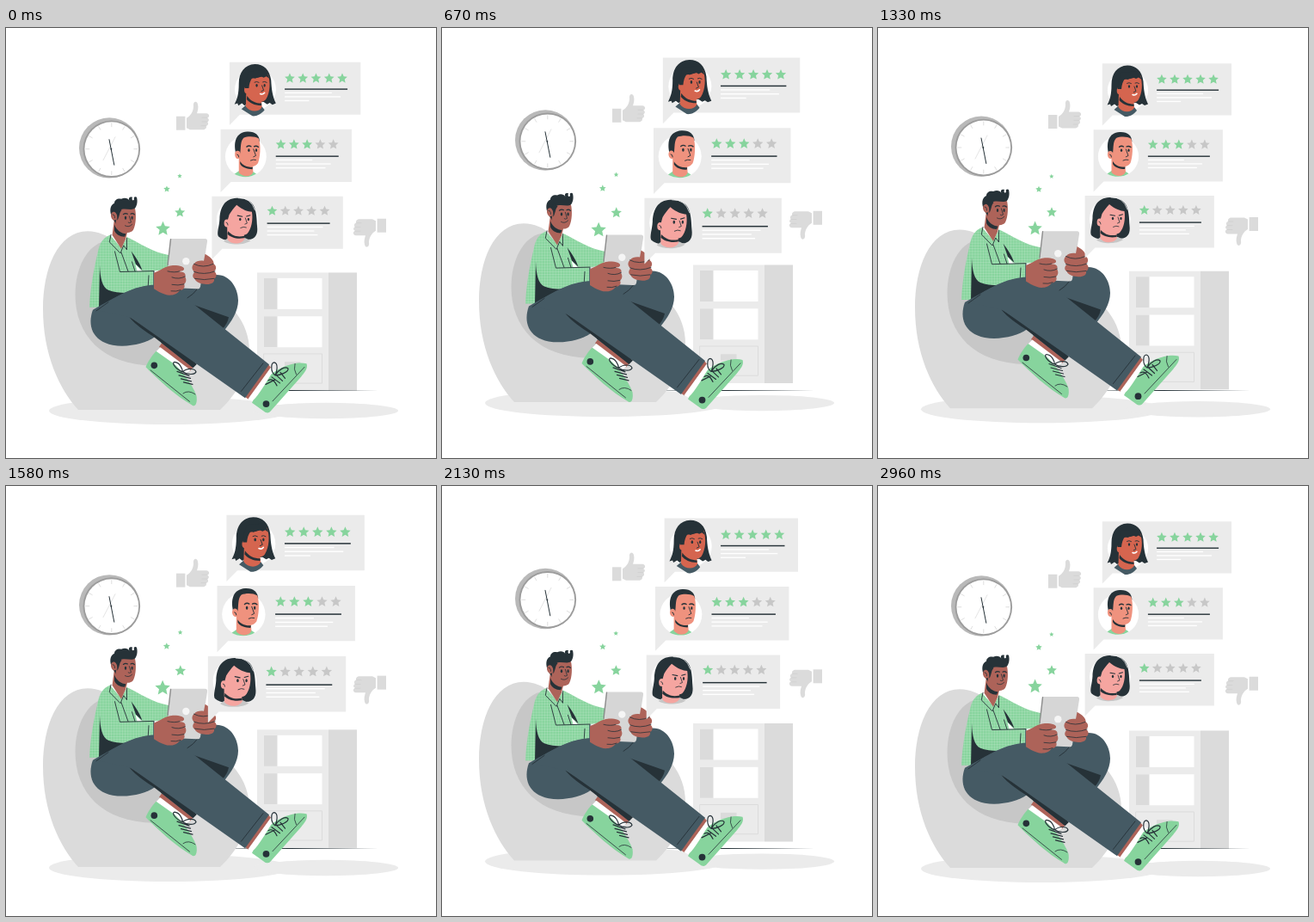
An HTML page with a canvas that plays this animation: 500x500 px, repeating every 3000 ms.

```html
<!DOCTYPE html>
<html lang="en">
<head>
<meta charset="utf-8">
<title>Reading reviews</title>
<style>
html, body { margin: 0; width: 100%; height: 100%; overflow: hidden; background: #fff; }
canvas { display: block; width: 500px; height: 500px; }
</style>
</head>
<body>
<canvas id="stage"></canvas>
<script>
const canvas = document.getElementById('stage');
const ctx = canvas.getContext('2d');
const ratio = Math.max(1, window.devicePixelRatio || 1);
canvas.width = canvas.height = 500 * ratio;

const GREEN = '#87d49d', DARK = '#263238', SLATE = '#455a64', SKIN = '#ad6359';
const PALE = '#ebebeb', GREY = '#dbdbdb', MID = '#c7c7c7', WHITE = '#fff';

const cache = {};
const path = d => cache[d] || (cache[d] = new Path2D(d));

function fill(color, d) {
  ctx.fillStyle = color;
  ctx.fill(path(d));
}

function line(color, width, d) {
  ctx.strokeStyle = color;
  ctx.lineWidth = width;
  ctx.stroke(path(d));
}

function rect(color, x, y, w, h) {
  ctx.fillStyle = color;
  ctx.fillRect(x, y, w, h);
}

function oval(color, x, y, rx, ry = rx, turn = 0) {
  ctx.fillStyle = color;
  ctx.beginPath();
  ctx.ellipse(x, y, rx, ry, turn, 0, Math.PI * 2);
  ctx.fill();
}

function star(color, x, y, r) {
  ctx.fillStyle = color;
  ctx.beginPath();
  for (let i = 0; i < 10; i++) {
    const a = i * Math.PI / 5 - Math.PI / 2;
    const d = i % 2 ? r * 0.47 : r;
    ctx.lineTo(x + d * Math.cos(a), y + d * Math.sin(a));
  }
  ctx.closePath();
  ctx.fill();
}

function group(draw, dx = 0, dy = 0) {
  ctx.save();
  ctx.translate(dx, dy);
  draw();
  ctx.restore();
}

function zoom(s, x, y, draw) {
  ctx.save();
  ctx.translate(x, y);
  ctx.scale(s, s);
  ctx.translate(-x, -y);
  draw();
  ctx.restore();
}

// Motion: p is the phase of a cycle, 0 to 1
const bob = p => -10 * (1 - Math.abs(1 - 2 * p));

function beat(p) {
  const keys = [[0, 1], [0.1, 1.1], [0.3, 1], [0.4, 1], [0.5, 1.1], [0.6, 1], [1, 1]];
  const i = keys.findIndex(k => k[0] > p);
  const [p0, s0] = keys[i - 1], [p1, s1] = keys[i];
  return s0 + (s1 - s0) * (p - p0) / (p1 - p0);
}

function shadows() {
  oval(PALE, 190, 445.3, 140, 16);
  oval(PALE, 372, 445.3, 84, 9.2);
}

function cabinet() {
  rect(PALE, 292, 284.7, 83, 137.5);
  rect(GREY, 375, 284.7, 33, 137.5);
  for (const y of [291.2, 335.5]) {
    rect(WHITE, 300, y, 67.5, 36);
    rect(GREY, 300, y, 15.5, 36);
  }
  line('#d8d8d8', 0.8, 'M300 379.2h67.5v34.2h-67.5z');
  rect(GREY, 324, 388.5, 18.5, 7.3);
}

function clock() {
  oval('#b9b9b9', 120.2, 139.7, 35.2);
  oval('#9c9c9c', 122.8, 141, 33.3);
  oval(WHITE, 122.8, 141, 31.4);
  ctx.strokeStyle = '#d2d2d2';
  ctx.lineWidth = 0.7;
  for (let i = 0; i < 12; i++) {
    const a = i * Math.PI / 6, c = Math.cos(a), s = Math.sin(a);
    ctx.beginPath();
    ctx.moveTo(122.8 + 26 * c, 141 + 26 * s);
    ctx.lineTo(122.8 + 30 * c, 141 + 30 * s);
    ctx.stroke();
  }
  line('#d2d2d2', 0.6, 'M127 127L113 154');
  line(DARK, 1, 'M120 130L125.8 159.5');
  oval(DARK, 122.4, 141, 0.9);
}

function thumb() {
  rect(GREY, 198, 103, 10.4, 16);
  fill(GREY, 'M210 105C215 102 218 97 218 91C217 86 222 84 223 89C224 93 223 96 222 99.5L233 99.5C237 100 237 104 234 105C237 106 236 109 234 109.5C236 111 235 114 232.5 114C234 116 232 118.5 229 118.5L214 118.5L210 116.5Z');
  line(MID, 0.5, 'M228 104.5h6M228 109.3h6M227 114h6');
}

function beanbag() {
  fill(GREY, 'M95 236.5C60 237 43 280 43 327C43 380 62 420 84 444.3L249 444.3C268 426 283 402 283 375C283 345 262 315 225 300C200 290 170 290 150 275C135 255 120 237 95 236.5Z');
  fill(MID, 'M116 248C94 252 80.5 280 80.5 310C80.5 358 112 392 172 393L205 372L180 300Z');
}

function shirtPattern(d) {
  ctx.save();
  ctx.clip(path(d));
  ctx.strokeStyle = 'rgba(255,255,255,.25)';
  ctx.lineWidth = 0.6;
  ctx.beginPath();
  for (let v = 97; v < 195; v += 3.2) {
    ctx.moveTo(v, 238);
    ctx.lineTo(v, 328);
    ctx.moveTo(95, v + 143);
    ctx.lineTo(192, v + 143);
  }
  ctx.stroke();
  ctx.restore();
}

function cloth(d) {
  fill(GREEN, d);
  shirtPattern(d);
}

function head() {
  fill(SKIN, 'M126 222L123.5 241L134 257L139 246L142 234Z');
  fill(DARK, 'M126 229C129 236 134 239 139.5 239.5L138 243C132 243 128 240 126 236Z');
  fill(DARK, 'M124 222C119.5 213 121 206 126 204C126 200 130 198 134 199C138 197 142 198 143.5 201C141.5 197 145 196 147 197C145.5 200 148 202 149 199.5C148 197 150 195.5 152 197C153.5 203 152 208 149 211L134 224L128 228Z');
  fill(SKIN, 'M132 212C138 208.5 145 213 150 210C151.5 217 151.5 228 148 235C145 239.5 137 239 132 234.5L127.5 227L129 218Z');
  oval(SKIN, 125.7, 218.8, 3.6, 5, -0.2);
  fill(DARK, 'M127 214C130 216 129 221 129.5 224C132 220 131.5 215 134.5 212L130 208Z');
  oval(DARK, 139, 221, 1.2, 2);
  oval(DARK, 146.6, 221, 1.1, 2);
  line(DARK, 1.2, 'M136.4 216.8Q138.8 214.8 141.4 216.3M145 216.3Q147.2 215 149.4 217');
  line(DARK, 0.8, 'M143.4 219L145.5 226Q143.7 227.5 142.2 226.3M138.5 230Q143 232.5 146.6 228.5M124 217Q127 217 126.5 221');
}

function shirt() {
  cloth('M140 243C155 250 170 261 190 264.5L188 281L160 284L144 262Z');
  cloth('M121 241C113 244 109 250 107 260C101 285 98 305 97 325L108 325L109 320L160 310L172 305L172 282.5L158 282.5L146 258L140.5 244L134 256Z');
  fill(DARK, 'M109 276C109.5 291 112 302 119 305C128 308.5 143 309 153 307L130 328L108 326Z');
  fill(DARK, 'M145.5 259.5C150 266 155 272 158.5 282L151 275Z');
  fill(WHITE, 'M150.5 275L158 283L152.5 283Z');
  fill(SLATE, 'M171.2 283h1.4v22h-1.4z');
  line(DARK, 0.9, 'M126.5 260L132.5 283.7L172 282.7M134 261L142 283M150 283L146.5 272M166 288L165 304');
}

function collar() {
  line(DARK, 0.9, 'M122 240.5L120.3 249L133 262L136.8 253L140.5 258L140.4 244.5');
}

function farShoe() {
  fill(SKIN, 'M183 364L219 393L214 399L178 371Z');
  fill(WHITE, 'M179.5 371.5L214.5 398L206 404L196 399L173.5 377.5Z');
  fill(GREEN, 'M174.5 376L195 390.5C203 397 216 413 221.5 428C222.5 435 221 440 217.5 439.5C197 428 177 409 162.5 394.5C165 388 170 381 174.5 376Z');
  line(DARK, 0.8, 'M168 398L213.5 434.5M206 425Q212 420.5 220 426');
  oval(DARK, 172.3, 392.5, 3.8);
  line(DARK, 1.2, 'M205.5 400C197 397 192 389 196 388.5C202 389 205 396 205.5 400C211 395 220 396 221 400C219 404 210 403 205.5 400M199 399.5L213 404.5M201 404L214.5 407.5M203.5 408L215.5 411M206.5 412L217 414.5');
}

function nearShoe() {
  fill(SKIN, 'M304.5 391L308 395L282 432L277 428.5Z');
  fill(WHITE, 'M308 395L316 400L292 437L281.5 431.5Z');
  fill(GREEN, 'M287.5 433C294 427 302 413 308 403.5C315 396 336 387 349.5 390.5C351.5 396 347 401 343 406L307 446.5C305 448.5 302 447.5 300 446L286 436Z');
  line(DARK, 0.8, 'M310 434L347 394.5M336 390.5Q334 397 337.5 403');
  oval(DARK, 302.5, 437.2, 3.9);
  line(DARK, 1.2, 'M313 404C307 400 308 389 312 389C317 390 315 400 313 404C317 397 325 393 328 396C329 400 319 404 313 404M305 410C310 407 313 412 315 416M309 406L318.5 413M314 403.5L321.5 410.5M319 400.5L324.5 407.5M302 414.5L313 409')
}

function trousers() {
  fill(SLATE, 'M185 304C215 299 235 283 251 288C264 292 270 306 270 317C270 330 262 342 253 353L216 394L180 366Z');
  fill(DARK, 'M212 320L259 336.5C258 342 255 347 251 351Z');
  line(DARK, 0.9, 'M211 314Q218 310 223 303');
  fill(SLATE, 'M101 328C94.5 346 100 364 124 369C142 372 162 367 173 359.5L190 302C162 294 139 306 101 328Z');
  fill(DARK, 'M143 336L190 365L222 391L217.5 395.5L181 366.5L172 359.5C162 353 151 346 143 336Z');
  fill(SLATE, 'M104 328C135 306 159 297.5 177 299C188 300 196 304 204 310L306 391.5L278 430.5L145 337Z');
  line(DARK, 0.9, 'M105 329L119 319M299 390L273.5 422.5');
}

function tablet() {
  fill('#d6d6d6', 'M191 245.2L231.5 245.2Q234.5 245.5 234 248.5L226 301Q225.5 304 222 303.5L187 302Z');
  line('#8c8c8c', 1.4, 'M191.5 245.8L188 276');
  oval('#f5f5f5', 209.3, 271.3, 4.2);
}

function hands() {
  fill(SKIN, 'M172 285C180 282 185 277 194 276.2C202 276 208 278 207 281C206 283 203 283 200 283.3C207 283 210 286 208 289C210 292 210 296 207 298C209 302 206 305 202 305.5C198 311 190 312 185 310C179 308 176 306 172 303.5Z');
  line(DARK, 0.8, 'M188 283Q196 285 202 283M193 290Q201 293 208.4 289M193 298.5Q200 300 207 298M192 306Q198 307 203 304.8');
  fill(SKIN, 'M231.5 263C237 266 242 270 241.5 274.5C245 277 245 281 242 283C246 286 245 290 242 292C243 297 237 299 231 298C226 297.5 221 296 219.5 292C216 290 217 286 219.5 284C215 281 216 276 219 274C221 270.5 227 270.5 230 271Z');
  line(DARK, 0.8, 'M218.5 274.5Q229 280 241 274.5M218.5 283.5Q230 288 243 283M219.5 291.5Q230 294 242 291.5');
}

function reader() {
  farShoe();
  nearShoe();
  shirt();
  head();
  collar();
  trousers();
  tablet();
  hands();
}

function eyes(x, y, gap) {
  oval(DARK, x, y, 1.2, 1.8);
  oval(DARK, x + gap, y, 1.1, 1.8);
}

function longBob() {
  const skin = '#d5654f';
  oval(WHITE, 290.5, 72.5, 23.6);
  fill(DARK, 'M290 43.5C278 44 271.5 53 271.5 66C271.5 78 269.5 84 266.5 89.5L270 88.5L271 91L275 88.5L278 91L283 88L300 87L304 89.5L307 88L310 90L314 88.5C310 80 309 72 308.5 62C307 50 300 43.5 290 43.5Z');
  fill(SLATE, 'M274.5 95L280 90C286 96 293 97 298 92L301 96C297 101 292 103.5 287 103Z');
  fill(skin, 'M280 74L279.5 92C284 99 295 99 298 92.5L297 82Z');
  fill(DARK, 'M281 80C285 86 291 88.5 297.5 88.5L297.5 91C289 91 284 88 280.5 84Z');
  fill(skin, 'M281.5 60C290 60 299 58 305 55C308 64 307.5 76 302.5 84C298 89.5 288 87 283 79Z');
  oval(skin, 281, 73, 3.3, 4.2);
  fill(DARK, 'M278.5 71C279 65 280 59 283 52L303 50L306.5 60L303 57.5L300 59L297 57.5L290 60L287.5 58.5C284.5 62 283.5 66 283 71Z');
  eyes(292, 68, 9);
  line(DARK, 0.9, 'M289.5 64.3Q292 62.8 294.5 64.5M299 64Q301 62.8 303.5 64.5M298 68L300 73.5L297.3 74.7');
  line(WHITE, 1.5, 'M296 77.5Q299 79 301 76.3');
}

function shortHair() {
  const skin = '#ef927e';
  oval(WHITE, 279.5, 149.4, 23.6);
  fill(GREEN, 'M266.5 169.5L273 165L288 167L291.5 169.3C285 174 274 174 266.5 169.5Z');
  fill(skin, 'M271.5 146L271.5 168C277 174 286 173 288 167L287 157Z');
  fill(DARK, 'M273 155C276 160 281 162 287.5 161.5L287 164C281 164 275 162 273 158Z');
  fill(DARK, 'M268 146C265 133 268 122 281 121C290 120.5 295 125 295.3 132L274 149Z');
  fill(skin, 'M273 146C274 139 273 132 277 128C282 126 290 126 294.5 129C297 138 296 150 293.5 157C289 163.5 280 162 275 156L271 150Z');
  oval(skin, 270.3, 147.5, 3.3, 4.6, -0.15);
  eyes(283, 142.3, 8.5);
  line(DARK, 1.3, 'M280.5 138.3Q283 136.3 285.5 138M289 138Q291.5 136.7 294 138.6');
  line(DARK, 0.9, 'M288.3 141L291 148.5L288.3 149.8M285 154Q288 152.5 291 153.3M269.5 147Q271.5 147 271.5 150');
}

function chinBob() {
  const skin = '#f5a5a0';
  oval(WHITE, 269.8, 222, 23.8);
  fill(DARK, 'M269 197C255 197.5 250 208 249.5 221C249 230 246 237 248 241C251 244 256 245.5 260 245.5L285 244.5C291 243 293.5 238 292.5 230C292 221 292 212 288 205C284 199 277 197 269 197Z');
  fill(MID, 'M254 246.5L259 243L279 243L285 246C278 251.5 260 251.5 254 246.5Z');
  fill(skin, 'M258 226L258.5 245C263 251 275 250.5 278 244L277 234Z');
  fill(DARK, 'M259 235C265 241 270 242 278 240.5L277.5 243C269 244.5 262 242 258.5 238.5Z');
  fill(skin, 'M260.5 216C263 212 266 208 269 205C276 211 282 212.5 286.5 213C288 222 286 233 281 238C275 242 264 238 260 231L258 225Z');
  oval(skin, 257.8, 226, 3.2, 4.4);
  line(WHITE, 0.7, 'M271 197Q285 196 290 211');
  eyes(273, 221.5, 9.5);
  line(DARK, 1.1, 'M270 217.2L275.5 218.3M280.3 218L284.5 216.8');
  line(DARK, 0.8, 'M279 220L281 226L278.5 227M273.5 231.3Q277 229.3 280 230.8M257 225Q259 225 259 228');
}

function card(x, y, starY, score, ends, avatar) {
  fill(PALE, `M${x} ${y}h150.3v60.3h-138.5l-11.8 12z`);
  for (let i = 0; i < 5; i++) star(i < score ? GREEN : MID, x + 69.1 + i * 15.05, starY, 6.1);
  rect(DARK, x + 63.3, y + 30.3, 72, 1.4);
  ends.forEach((w, i) => rect(WHITE, x + 63.3, y + 34.6 + i * 4.5, w, 1.3));
  avatar();
}

function cards() {
  card(260.8, 41.2, 59.9, 5, [54, 64, 28], longBob);
  card(250.6, 118.2, 135.7, 3, [42, 63, 57], shortHair);
  card(240.6, 195.1, 212, 1, [64, 54, 58], chinBob);
}

function sparks() {
  star(GREEN, 182.6, 233.2, 8.6);
  star(GREEN, 202, 214.4, 6.2);
  star(GREEN, 187, 187.6, 3.9);
  star(GREEN, 201.8, 172.6, 2.8);
}

function draw(ms) {
  const t = (ms + 20) % 3000;
  const quick = t % 1500 / 1500;
  const lift = bob(quick), size = beat(quick);

  ctx.setTransform(ratio, 0, 0, ratio, 0, 0);
  ctx.lineCap = ctx.lineJoin = 'round';
  rect(WHITE, 0, 0, 500, 500);

  group(() => {
    shadows();
    cabinet();
    clock();
    thumb();
    ctx.translate(640, 341);
    ctx.rotate(Math.PI);
    thumb();
  }, 0, lift);
  fill(DARK, 'M225 421.3L330 421L433 421.4L330 421.9Z');
  group(beanbag, 0, lift);
  group(reader, 0, bob(t / 3000));
  zoom(size, 326, 151, cards);
  zoom(size, 190, 206, sparks);
}

const start = performance.now();
function tick() {
  draw(performance.now() - start);
  requestAnimationFrame(tick);
}
tick();
</script>
</body>
</html>
```
